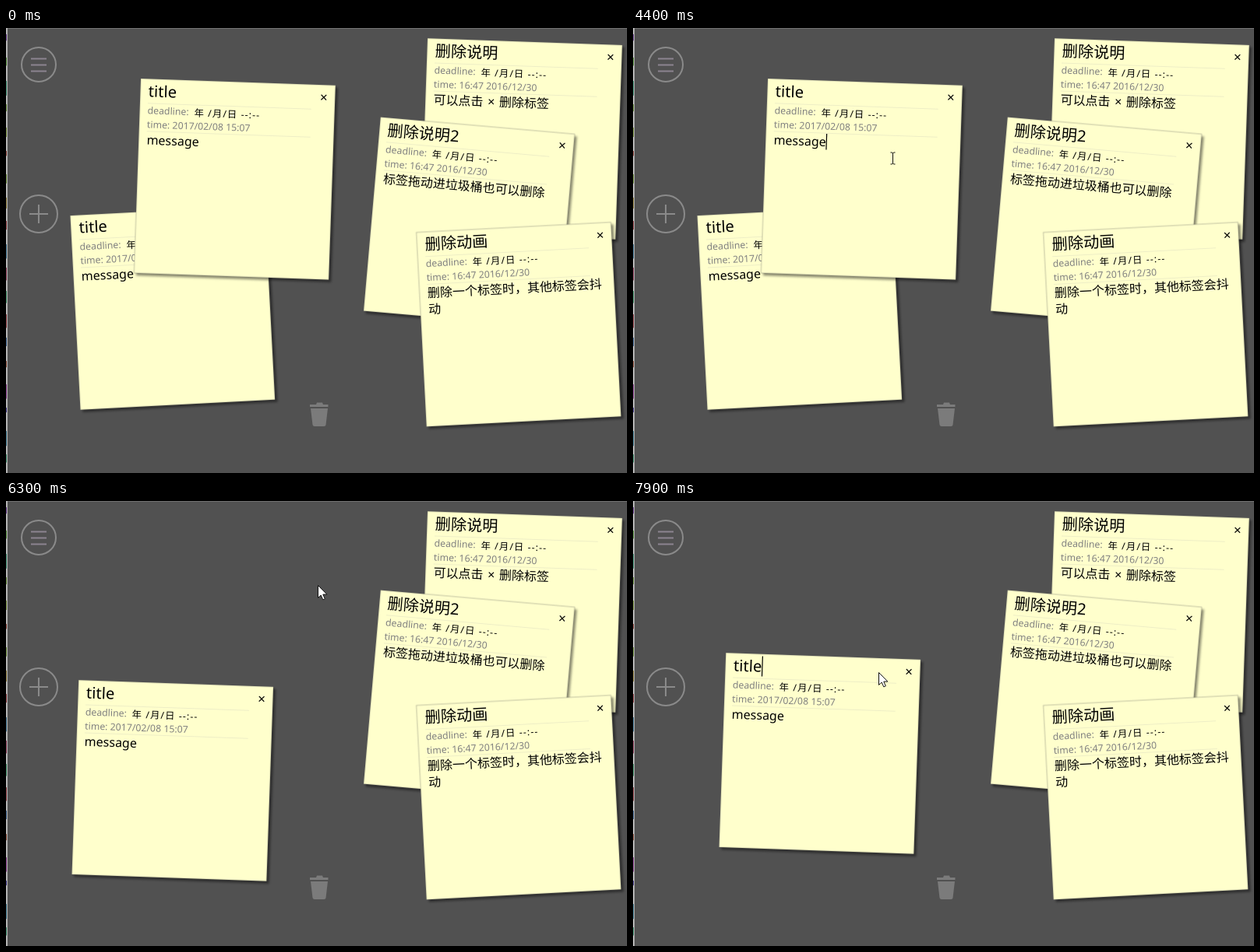
These frames come from a looping animation (797 px wide and 572 px high, 8000 ms). An HTML page:

```html
<!DOCTYPE html>
<html lang="zh-CN">
<head>
<meta charset="utf-8">
<title>Sticky notes</title>
<style>
  html, body { margin: 0; width: 100%; height: 100%; overflow: hidden; background: #515151; }
  svg { display: block; width: 100vw; height: 100vh; font-family: 'Noto Sans', 'Noto Sans CJK SC', 'Noto Sans CJK', sans-serif; }
  .paper { fill: #ffffcc; stroke: rgba(80,80,80,.35); filter: drop-shadow(3px 3px 1.5px rgba(0,0,0,.45)); }
  .rule { stroke: #eeeec6; }
  .title { font-size: 20.2px; }
  .label { font-size: 12.3px; fill: #808080; }
  .date { font-size: 12.3px; letter-spacing: 1.1px; }
  .message { font-size: 16px; word-spacing: 1.5px; }
  .close { font-size: 17px; text-anchor: middle; }
  .icon { fill: none; stroke: #8a8a8a; stroke-width: 2; }
</style>
</head>
<body>
<svg viewBox="0 0 797 572">
  <rect width="797" height="572" fill="#515151"/>
  <path d="M0 .5H797" stroke="#707070"/>
  <g id="edge"><path d="M1 0V572" stroke="#b4b4b4" stroke-width="2"/></g>
  <g class="icon">
    <circle cx="42" cy="47" r="22"/>
    <path d="M32 39.5h20m-20 8h20m-20 8h20" stroke="#8c8490"/>
    <circle cx="42" cy="239" r="24"/>
    <path d="M30 239h24m-12 -12v24"/>
  </g>
  <path fill="#7b7b7b" d="M390 484h8l1 -2.5h7l1 2.5h6.5v3h-23.5zM391 489h22l-2.5 21q0 2 -2.5 2h-12q-2 0 -2.5 -2z"/>
  <g id="board"></g>
  <rect id="caret" width="1.2"/>
  <path id="beam" d="M-3 -7.5h2l1 1l1 -1h2M0 -6.5v13M-3 7.5h2l1 -1l1 1h2" fill="none" stroke="#111"/>
  <path id="arrow" d="M0 0v16l3.7 -3.4l2.6 5.8l2.5 -1.1l-2.5 -5.7h5.1z" fill="#fff" stroke="#111"/>
</svg>
<script>
const LOOP = 8000, STEP = 100, SIZE = 250;
const DELETE_AT = 5900, DRAG_AT = 7000;
const $ = id => document.getElementById(id);
const move = (el, transform) => el.setAttribute('transform', transform);
const show = (el, visible) => el.style.display = visible ? '' : 'none';

// Sliver of another window along the left edge
const random = seed => Math.abs(Math.sin(seed * 127.1) * 43758.5) % 1;
for (let y = 8; y < 572; y += 30) {
  const hue = 360 * random(y), height = 5 + 15 * random(y + 1);
  $('edge').innerHTML += `<rect y="${y}" width="1" height="${height}" fill="hsl(${hue} 45% 35%)"/>`;
}

// x, y: centre of the note
const OLD = '16:47 2016/12/30', NEW = '2017/02/08 15:07';
const notes = {
  intro: { x: 661.6, y: 142.5, angle: 2, title: '删除说明', time: OLD, lines: ['可以点击 × 删除标签'] },
  intro2: { x: 594.4, y: 250, angle: 5, title: '删除说明2', time: OLD, lines: ['标签拖动进垃圾桶也可以删除'] },
  shaking: { x: 658, y: 381, angle: -3, title: '删除动画', time: OLD, lines: ['删除一个标签时，其他标签会抖', '动'] },
  lower: { x: 213.8, y: 359.4, angle: -3, title: 'title', time: NEW, lines: ['message'] },
  upper: { x: 293.6, y: 194.3, angle: 2, title: 'title', time: NEW, lines: ['message'] },
};

for (const note of Object.values(notes)) {
  note.el = document.createElementNS('http://www.w3.org/2000/svg', 'g');
  note.el.innerHTML = `
    <rect class="paper" width="${SIZE}" height="${SIZE}"/>
    <path class="rule" d="M10 31.5h210m-210 36h210"/>
    <text class="title" x="10.3" y="23">${note.title}</text>
    <text class="label" x="10" y="45">deadline:</text>
    <text class="date" x="70" y="46">年 /月/日 --:--</text>
    <text class="label" x="10" y="63">time: ${note.time}</text>
    ${note.lines.map((line, i) => `<text class="message" x="10.3" y="${84.3 + 21 * i}">${line}</text>`).join('')}
    <text class="close" x="235.5" y="22">×</text>`;
}

// A click raises its note and puts the caret after a character, by default the last
const clicks = [
  { at: 800, name: 'intro', field: 'title' },
  { at: 2300, name: 'intro2', field: 'message', chars: 3 },
  { at: 3400, name: 'lower' },
  { at: 3400, name: 'shaking', field: 'message' },
  { at: 4300, name: 'upper', field: 'message' },
  { at: 5400, name: 'upper' },
  { at: DRAG_AT, name: 'lower', field: 'title' },
];

// Pointer legs: start, end, x, y reached
const grab = { x: 273, y: 238 };
const legs = [
  [100, 400, 737, 63], [700, 800, 727, 36], [1200, 2100, 535, 257], [2600, 3100, 718, 441],
  [3600, 4300, 333, 167], [4600, 5000, 400, 88], [5200, 5500, 412, 92],
  [DELETE_AT, 6300, 400, 108], [6300, 6900, grab.x, grab.y],
  [DRAG_AT, 7400, 335, 160], [7400, 7600, 331, 136], [7600, 7800, 299, 203], [7800, 7900, 315, 220],
];

function pointerAt(t) {
  let x = 772, y = 77;
  for (const [start, end, toX, toY] of legs) {
    const k = Math.min(1, Math.max(0, (t - start) / (end - start)));
    const eased = k * k * (3 - 2 * k);
    x += (toX - x) * eased;
    y += (toY - y) * eased;
  }
  return { x, y };
}

function stackNotes(done, t) {
  const order = Object.keys(notes);
  for (const { name } of done) order.push(...order.splice(order.indexOf(name), 1));
  const stack = order.filter(name => name !== 'upper' || t < DELETE_AT);
  $('board').replaceChildren(...stack.map(name => notes[name].el));
}

function placeNotes(t) {
  const shakeTime = (t - DELETE_AT + 100) / 400;
  const sway = shakeTime > 0 && shakeTime < 1 ? 1 - 1.3 * Math.sin(Math.PI * shakeTime) : 1;
  // The dragged note trails the pointer by one step
  const hand = t < DRAG_AT ? grab : pointerAt(t - STEP);
  notes.lower.angle = t < DELETE_AT ? -3 : 2;
  for (const note of Object.values(notes)) {
    const held = note === notes.lower;
    const x = note.x + (held ? hand.x - grab.x : 0), y = note.y + (held ? hand.y - grab.y : 0);
    note.transform = `translate(${x} ${y}) rotate(${note.angle * sway}) translate(${-SIZE / 2} ${-SIZE / 2})`;
    move(note.el, note.transform);
  }
}

function placeCaret(click) {
  show($('caret'), click?.field);
  if (!click?.field) return;
  const note = notes[click.name];
  const text = [...note.el.querySelectorAll('.' + click.field)].pop();
  const size = parseFloat(getComputedStyle(text).fontSize);
  const end = text.getEndPositionOfChar((click.chars ?? text.textContent.length) - 1);
  move($('caret'), `${note.transform} translate(${end.x} ${end.y - size})`);
  $('caret').setAttribute('height', size * 1.28);
}

let lastTime;
function draw(now) {
  const t = Math.floor(now % LOOP / STEP) * STEP;
  if (t === lastTime) return;
  lastTime = t;

  const done = clicks.filter(click => click.at <= t);
  stackNotes(done, t);
  placeNotes(t);
  placeCaret(done.at(-1));

  const overClose = t >= 5500, pointer = pointerAt(t);
  notes.upper.el.querySelector('.close').setAttribute('fill', overClose ? '#888' : '#000');
  for (const id of ['beam', 'arrow']) {
    move($(id), `translate(${pointer.x + .5} ${pointer.y + .5})`);
    show($(id), t > 0 && overClose === (id === 'arrow'));
  }
}

const start = performance.now();
function loop() {
  draw(performance.now() - start);
  requestAnimationFrame(loop);
}
loop();
</script>
</body>
</html>
```
